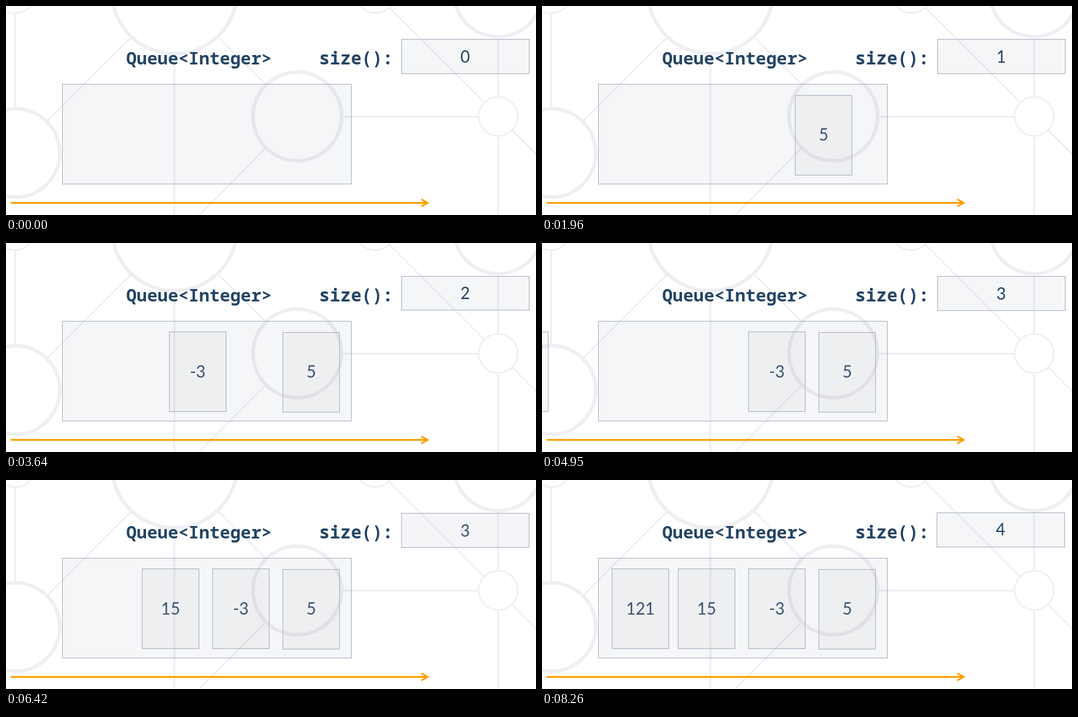
These frames come from a looping animation (897x354 px, 8720 ms). An HTML page with a canvas:

```html
<!DOCTYPE html>
<html lang="en">
<head>
<meta charset="utf-8">
<title>Queue size</title>
<style>
html, body { margin: 0; width: 100%; height: 100%; overflow: hidden; background: #fff; }
canvas { display: block; }
</style>
</head>
<body>
<canvas id="stage" width="897" height="354"></canvas>
<script>
const ctx = document.getElementById('stage').getContext('2d');
const LOOP = 8720, FIRST = 500, STEP = 76.5;
const INK = '#234465', NET = '#efeff3', EDGE = '#a3aabc';
const ITEM_W = 96, ITEM_H = 135;

// Each size value fades in over the previous one.
const sizes = [
  { label: '0', x: 669, y: 56, h: 58, base: 96, start: -1, dur: 1 },
  { label: '1', x: 669, y: 56, h: 58, base: 96, start: 460, dur: 560 },
  { label: '2', x: 669, y: 56, h: 57, base: 95, start: 2300, dur: 500 },
  { label: '3', x: 669, y: 56, h: 58, base: 96, start: 4215, dur: 560 },
  { label: '4', x: 668, y: 55, h: 58, base: 94, start: 6330, dur: 460 }
];

const items = [
  { label: '5', x: 468, y: 151, start: 1138, dur: 1190 },
  { label: '-3', x: 349, y: 150, start: 2983, dur: 1200 },
  { label: '15', x: 230, y: 150, start: 4918, dur: 1278 },
  { label: '121', x: 118, y: 150, start: 7055, dur: 1117 }
];

const progress = (t, { start, dur }) => Math.min(1, Math.max(0, (t - start) / dur));
const easeOut = u => 1 - Math.pow(1 - u, 2.3);

function line(color, width, ...points) {
  ctx.strokeStyle = color;
  ctx.lineWidth = width;
  ctx.beginPath();
  points.forEach(([x, y]) => ctx.lineTo(x, y));
  ctx.stroke();
}

function ring(x, y, r, width) {
  ctx.strokeStyle = NET;
  ctx.lineWidth = width;
  ctx.beginPath();
  ctx.arc(x, y, r, 0, Math.PI * 2);
  ctx.stroke();
}

function panel(x, y, w, h, fill) {
  ctx.fillStyle = fill;
  ctx.fillRect(x, y, w + 1, h + 1);
  ctx.strokeStyle = EDGE;
  ctx.lineWidth = 1;
  ctx.strokeRect(x + 0.5, y + 0.5, w, h);
}

function text(label, x, y, font, color, align) {
  ctx.font = font;
  ctx.fillStyle = color;
  ctx.textAlign = align;
  ctx.fillText(label, x, y);
}

const number = (label, x, y, color) => text(label, x, y, '28px Lato, sans-serif', color, 'center');
const code = (label, x, y, px) => text(label, x, y, `bold ${px}px "Noto Sans Mono", monospace`, INK, 'left');

function drawNetwork() {
  const links = [
    [[15.5, 13], [15.5, 173]], [[285, 83], [285, 354]],
    [[213, 52], [67, 198]], [[358, 52], [441, 134]],
    [[441, 239], [326, 355]], [[570, 187.5], [799, 187.5]],
    [[649, 3], [810, 164]], [[833, 54], [833, 154]],
    [[833, 221], [833, 354]], [[856, 210], [900, 254]]
  ];
  links.forEach(link => line(NET, 3, ...link));
  ring(285, -25, 106, 6);
  ring(493, 187, 75, 6);
  ring(16, 249, 75, 6);
  ring(833, -23, 75, 6);
  ring(833, 187, 33, 2.5);
  ring(16, -21, 33, 2.5);
  ring(625, -21, 33, 2.5);
}

function drawArrow() {
  line('#ff9f00', 3, [8, 333.5], [713, 333.5]);
  line('#ff9f00', 3, [703, 327.5], [713.5, 333.5], [703, 339.5]);
}

function drawSizes(t) {
  sizes.forEach((size, i) => {
    const next = sizes[i + 1];
    ctx.globalAlpha = progress(t, size) * (next ? 1 - progress(t, next) : 1);
    if (!ctx.globalAlpha) return;
    panel(size.x, size.y, 216, size.h, 'rgba(68,84,116,0.05)');
    number(size.label, size.x + 108, size.base, INK);
  });
  ctx.globalAlpha = 1;
}

function drawItem(item, t) {
  const u = progress(t, item);
  if (!u) return;
  const from = -ITEM_W - 1;
  const x = Math.round(from + (item.x - from) * easeOut(u));
  panel(x, item.y, ITEM_W, ITEM_H, 'rgba(120,120,125,0.06)');
  number(item.label, x + ITEM_W / 2 + 0.5, 228, '#3a5373');
}

function draw(t) {
  ctx.fillStyle = '#fff';
  ctx.fillRect(0, 0, 897, 354);
  drawNetwork();
  panel(95, 132, 489, 169, 'rgba(68,84,116,0.05)');
  code('Queue<Integer>', 203.5, 99, 29.33);
  code('size():', 530, 99, 29.8);
  drawSizes(t);
  items.forEach(item => drawItem(item, t));
  drawArrow();
}

// The motion advances in even steps after the opening pause.
function poseTime(t) {
  return t < FIRST ? 0 : FIRST + Math.floor((t - FIRST) / STEP + 0.15) * STEP;
}

function tick() {
  draw(poseTime(performance.now() % LOOP));
  requestAnimationFrame(tick);
}
tick();
</script>
</body>
</html>
```
